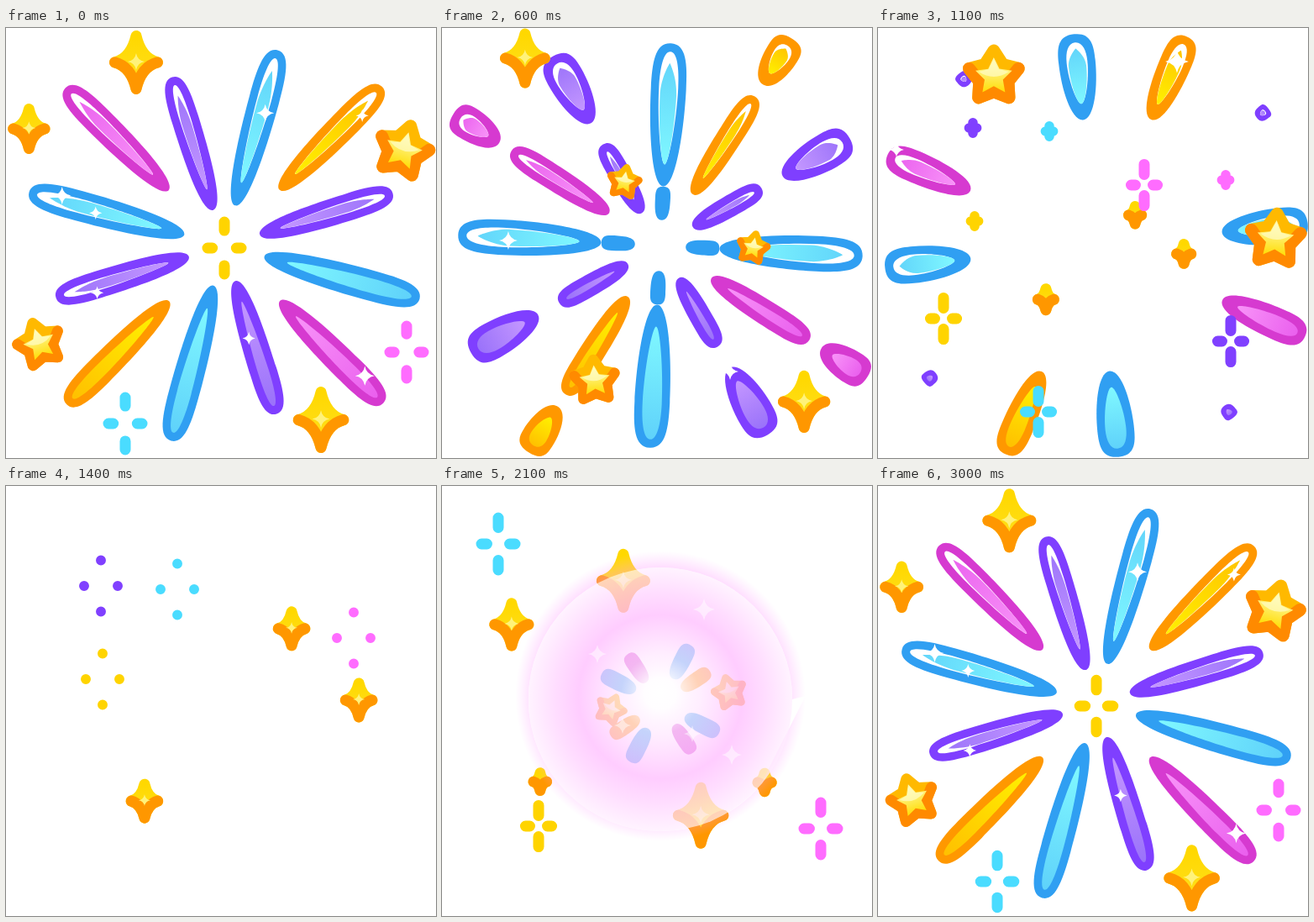
Animation, 512 px wide and 512 px high, one loop 3.02 s. Source, as an HTML page with a canvas:

```html
<!DOCTYPE html>
<html>
<head>
<meta charset="utf-8">
<style>
html, body { margin: 0; width: 100%; height: 100%; overflow: hidden; background: #fff; }
canvas { display: block; width: 512px; height: 512px; }
</style>
</head>
<body>
<canvas id="stage" width="512" height="512"></canvas>
<script>
const ctx = document.getElementById('stage').getContext('2d');
const LOOP = 3020, HOLD = 3010, CX = 260, CY = 259, RAD = Math.PI / 180;

// Linear keyframes [time, ...values]; null outside their range.
function key(t, keys) {
  for (let i = 1; i < keys.length; i++) {
    const a = keys[i - 1], b = keys[i];
    if (t >= a[0] && t <= b[0]) {
      const p = (t - a[0]) / (b[0] - a[0]);
      return a.slice(1).map((v, j) => v + (b[j + 1] - v) * p);
    }
  }
  return null;
}
// Keyframes may run past the end of the loop.
const at = (t, keys) => key(t, keys) || key(t + LOOP, keys);

const SPIN = [[2000, 14], [2100, 11.5], [2400, 6.5], [HOLD, 0], [3620, -12.5], [4120, -21.5], [4500, -28]];

// Bursts: [time, inner radius, outer radius, half width]
const PETALS = [
  {
    edge: '#7f3fff', from: '#c497ff', to: '#9a72fa', angles: [253, -17, 73, 163],
    waves: [
      [[2250, 44, 46, 3], [2400, 37, 97, 10], [HOLD, 42, 209, 16], [3620, 167, 259, 22], [3850, 256, 268, 0]],
      [[400, 28, 30, 3], [600, 44, 138, 13], [900, 170, 262, 20], [1100, 244, 262, 9], [1150, 254, 258, 0]]
    ]
  },
  {
    edge: '#309ff2', from: '#80f8ff', to: '#5fd2fa', angles: [-74.5, 15.5, 105.5, 195.5],
    waves: [
      [[2040, 25, 30, 4], [2100, 33, 78, 10], [2400, 45, 190, 16], [HOLD, 49, 241, 18], [3620, 70, 241, 21], [3850, 200, 256, 18], [3950, 250, 258, 0]],
      [[480, 25, 30, 4], [600, 30, 70, 9], [1100, 150, 253, 22], [1350, 258, 264, 0]]
    ]
  },
  {
    edge: '#d63ad0', from: '#f893f8', to: '#ea60ee', angles: [225, 45],
    waves: null
  },
  {
    edge: '#ff9800', from: '#fff000', to: '#ffc000', angles: [-45, 135],
    waves: null
  }
];
const DIAGONAL = [
  [[2040, 25, 30, 4], [2100, 30, 70, 9], [2400, 78, 218, 16], [HOLD, 91, 266, 17], [3620, 227, 292, 20], [3760, 285, 295, 0]],
  [[380, 25, 30, 4], [600, 72, 210, 15], [1100, 163, 271, 19], [1300, 272, 280, 0]]
];

// Four-pointed gold stars: [time, x, y, scale]
const GEMS = [
  [[1580, 246, 165, 0], [1760, 238, 138, .53], [2100, 216, 113, 1], [2400, 180, 54, 1], [HOLD, 156, 41, 1], [3620, 99, 36, .94], [3800, 75, 40, 0]],
  [[1900, 115, 195, 0], [2100, 83, 165, .83], [2400, 39, 137, .82], [HOLD, 28, 120, .81], [3400, 5, 120, 0]],
  [[1960, 296, 355, 0], [2100, 308, 392, 1.04], [2400, 347, 457, 1.03], [HOLD, 374, 467, 1.04], [3620, 431, 445, .98], [3800, 455, 430, 0]],
  [[1600, 190, 285, 0], [1760, 176, 307, .5], [2100, 117, 352, .45], [2200, 100, 360, 0]],
  [[1600, 305, 368, 0], [1760, 333, 365, .6], [2100, 384, 353, .46], [2200, 398, 348, 0]],
  [[1000, 296, 233, 0], [1100, 306, 223, .44], [1400, 340, 170, .7], [1620, 355, 140, 0]],
  [[1000, 345, 267, 0], [1100, 364, 269, .47], [1400, 420, 255, .7], [1620, 450, 240, 0]],
  [[1000, 208, 312, 0], [1100, 200, 323, .5], [1400, 165, 375, .7], [1620, 150, 405, 0]]
];

// Five-pointed gold stars: [time, x, y, scale, tilt]
const STARS = [
  [[2020, 318, 252, 0, -20], [2100, 342, 246, .58, -15], [2400, 430, 200, 1, -8], [HOLD, 472, 148, 1, 16], [3300, 500, 100, .8, 25], [3450, 510, 80, 0, 30]],
  [[2020, 220, 264, 0, 30], [2100, 201, 266, .52, 24], [2400, 98, 322, .86, 14], [HOLD, 41, 375, .86, -18], [3300, 18, 415, .7, -30], [3450, 8, 430, 0, -35]],
  [[430, 236, 220, 0, 15], [600, 217, 184, .57, 10], [1100, 138, 58, 1, 0], [1400, 95, 28, 0, -8]],
  [[430, 335, 264, 0, 20], [600, 370, 262, .55, 12], [1100, 473, 252, 1, 4], [1400, 505, 240, 0, -5]],
  [[380, 205, 365, 0, 0], [600, 182, 420, .82, -4], [850, 160, 470, .8, -10], [980, 150, 490, 0, -14]]
];

// White glints: [time, x, y, radius]
const GLINTS = [
  [[2250, 312, 130, 0], [2400, 311, 117, 12], [HOLD, 309, 102, 11], [3300, 300, 85, 0]],
  [[2250, 405, 150, 0], [2400, 416, 135, 9], [HOLD, 424, 105, 8], [3250, 428, 90, 0]],
  [[2250, 125, 207, 0], [2400, 105, 203, 12], [HOLD, 67, 199, 11], [3300, 60, 215, 0]],
  [[2300, 135, 226, 0], [2400, 128, 224, 6], [HOLD, 107, 220, 8], [3300, 100, 225, 0]],
  [[2700, 120, 312, 0], [HOLD, 109, 315, 8], [3250, 100, 320, 0]],
  [[2700, 285, 355, 0], [HOLD, 289, 369, 8], [3250, 293, 380, 0]],
  [[2700, 410, 400, 0], [HOLD, 427, 414, 12], [3300, 435, 418, 0]],
  [[430, 79, 245, 0], [600, 79, 253, 11], [780, 70, 262, 0]],
  [[430, 340, 400, 0], [600, 343, 409, 10], [780, 347, 418, 0]],
  [[980, 356, 48, 0], [1100, 356, 40, 14], [1220, 356, 32, 0]],
  [[980, 26, 148, 0], [1100, 22, 145, 9], [1220, 18, 142, 0]]
];

// Crosses: [x, y, start, colour, life]
const YEL = '#ffd400', PINK = '#ff6cff', CYAN = '#4adcff', VIO = '#8040ff';
const LIFE = 420;
const CROSSES = [
  [260, 262, 2795, YEL], [142, 471, 2795, CYAN], [477, 386, 2300, PINK, 1280],
  [78, 346, 974, YEL], [317, 187, 974, PINK], [191, 457, 974, CYAN], [420, 373, 974, VIO],
  [113, 119, 1058, VIO], [204, 123, 1058, CYAN], [115, 230, 1058, YEL], [414, 181, 1058, PINK],
  [358, 88, 1424, YEL], [245, 263, 1424, CYAN], [167, 289, 1424, VIO], [324, 445, 1424, PINK],
  [286, 71, 1550, VIO], [443, 247, 1550, CYAN], [350, 312, 1550, YEL], [264, 365, 1550, PINK],
  [352, 191, 1634, VIO], [162, 162, 1634, YEL], [88, 327, 1634, PINK], [189, 403, 1634, CYAN],
  [67, 69, 1890, CYAN], [451, 408, 1890, PINK], [115, 405, 1974, YEL]
];
// [phase, v inner, v outer, h inner, h outer, thickness]
const CROSS = [
  [0, 0, 0, 0, 0, 0], [.1, 5, 6, 4, 4.5, 11.5], [.3, 12.5, 24.5, 10.5, 15.5, 13],
  [.5, 19.5, 31, 13.5, 20, 13], [.8, 30.5, 30.5, 20, 20, 13], [1, 30.5, 30.5, 20, 20, 0]
];

function fill(style) { ctx.fillStyle = style; ctx.fill(); }
function stroke(style, width) {
  ctx.strokeStyle = style;
  ctx.lineWidth = width;
  ctx.stroke();
}
function grad(x0, y0, x1, y1, a, b) {
  const g = ctx.createLinearGradient(x0, y0, x1, y1);
  g.addColorStop(0, a);
  g.addColorStop(1, b);
  return g;
}

function teardrop(a, b, w, n, tip) {
  const len = b - a, m = a + len * .68;
  ctx.beginPath();
  ctx.moveTo(a, 0);
  ctx.bezierCurveTo(a, -n, m - len * .3, -w, m, -w);
  ctx.bezierCurveTo(m + len * .18, -w, b, -w * tip, b, 0);
  ctx.bezierCurveTo(b, w * tip, m + len * .18, w, m, w);
  ctx.bezierCurveTo(m - len * .3, w, a, n, a, 0);
}

function petal(style, angle, a, b, w) {
  const len = b - a;
  if (w < .5 || len < 1) return;
  ctx.save();
  ctx.translate(CX, CY);
  ctx.rotate(angle * RAD);
  teardrop(a, b, w, Math.min(14, w), .9);
  fill(style.edge);
  const half = w - Math.min(9.5, len * .3);
  if (half > 1) {
    const i = a + Math.min(len * .1 + 9, len * .3), o = b - Math.min(10, len * .28);
    const shade = grad(i, 0, o, 0, style.from, style.to);
    const shiny = Math.sin((angle + 8) * RAD) < .36;
    teardrop(i, o, half, half * .4, .7);
    fill(shiny ? '#fff' : shade);
    if (shiny) {
      teardrop(i, o - (o - i) * .1, half * .85, half * .4, 0);
      fill(shade);
    }
  }
  ctx.restore();
}

function spark(x, y, r, ry, style) {
  ctx.beginPath();
  ctx.moveTo(x, y - ry);
  ctx.quadraticCurveTo(x + r * .15, y - ry * .15, x + r, y);
  ctx.quadraticCurveTo(x + r * .15, y + ry * .15, x, y + ry);
  ctx.quadraticCurveTo(x - r * .15, y + ry * .15, x - r, y);
  ctx.quadraticCurveTo(x - r * .15, y - ry * .15, x, y - ry);
  fill(style);
}

function gem([x, y, s]) {
  if (s < .03) return;
  const lw = 13 * Math.min(1, s * 2.2), px = 32 * s - lw / 2, py = 38 * s - lw / 2;
  const kx = px * .24, ky = py * .16;
  ctx.save();
  ctx.translate(x, y);
  ctx.beginPath();
  ctx.moveTo(-px, 0);
  ctx.quadraticCurveTo(-kx, -ky, 0, -py);
  ctx.quadraticCurveTo(kx, -ky, px, 0);
  ctx.quadraticCurveTo(kx, ky, 0, py);
  ctx.quadraticCurveTo(-kx, ky, -px, 0);
  ctx.closePath();
  const tone = grad(0, -py, 0, py, '#ffd800', '#ffe020');
  fill(tone);
  stroke(tone, lw);
  ctx.beginPath();
  ctx.moveTo(-px, 0);
  ctx.quadraticCurveTo(-kx, ky, 0, py);
  ctx.quadraticCurveTo(kx, ky, px, 0);
  stroke('#ff9700', lw);
  if (s > .65) spark(0, -1, 10 * s, 10 * s, '#fff27a');
  ctx.restore();
}

function starPoints(outer, inner) {
  return Array.from({ length: 10 }, (_, i) => {
    const r = i % 2 ? inner : outer, a = (i * 36 - 90) * RAD;
    return [r * Math.cos(a), r * Math.sin(a)];
  });
}
function trace(points) {
  ctx.beginPath();
  points.forEach(p => ctx.lineTo(p[0], p[1]));
}

function star([x, y, s, tilt]) {
  if (s < .03) return;
  ctx.save();
  ctx.translate(x, y);
  ctx.rotate(tilt * RAD);
  ctx.scale(s, s);
  const rim = starPoints(31, 18);
  trace(rim);
  ctx.closePath();
  fill('#ffc400');
  stroke('#ffb900', 15);
  trace(rim.slice(2, 9));
  stroke('#ff8a00', 15);
  trace(starPoints(23, 11.5));
  ctx.closePath();
  fill(grad(0, -18, 0, 20, '#fff9a8', '#ffdc00'));
  ctx.beginPath();
  ctx.moveTo(-18, -6);
  ctx.lineTo(-6, -9);
  ctx.lineTo(0, -20);
  ctx.lineTo(6, -9);
  ctx.lineTo(18, -6);
  ctx.quadraticCurveTo(0, 6, -18, -6);
  fill('rgba(255,252,200,.7)');
  ctx.restore();
}

function cross(t, [x, y, start, color, life = LIFE]) {
  const p = ((t - start + LOOP) % LOOP) / life;
  if (p > 1) return;
  const [vi, vo, hi, ho, lw] = key(p, CROSS);
  if (lw < .5) return;
  ctx.beginPath();
  for (const d of [-1, 1]) {
    ctx.moveTo(x, y + d * vi);
    ctx.lineTo(x, y + d * vo + .01);
    ctx.moveTo(x + d * hi, y);
    ctx.lineTo(x + d * ho + .01, y);
  }
  stroke(color, lw);
}

function glow(t) {
  const k = key(t, [[1960, 1, .6], [2100, 156, 1], [2160, 222, .75], [2220, 236, .45], [2340, 244, 0]]);
  if (!k) return;
  const [r, alpha] = k, y = 254;
  ctx.save();
  ctx.globalAlpha = alpha;
  const halo = ctx.createRadialGradient(CX, y - 4, r * .95, CX, y - 4, r * 1.1);
  halo.addColorStop(0, 'rgba(255,150,255,.4)');
  halo.addColorStop(1, 'rgba(255,170,255,0)');
  ctx.beginPath();
  ctx.arc(CX, y - 4, r * 1.1, 0, 7);
  ctx.arc(CX, y, r, 0, 7, true);
  ctx.fillStyle = halo;
  ctx.fill('evenodd');
  const g = ctx.createRadialGradient(CX, y - 8, 0, CX, y, r);
  [[0, 255, 1], [.12, 253, .95], [.3, 232, .72], [.62, 190, .78], [.8, 210, .75], [1, 238, .72]]
    .forEach(([p, green, a]) => g.addColorStop(p, `rgba(255,${green},255,${a})`));
  ctx.beginPath();
  ctx.arc(CX, y, r, 0, 7);
  fill(g);
  ctx.globalAlpha = alpha * .5;
  [[312, 147, 13], [185, 200, 11], [345, 320, 12], [298, 295, 10], [215, 285, 10]]
    .forEach(([sx, sy, sr]) => spark(sx, sy, sr, sr, '#fff'));
  ctx.restore();
}

function draw(t) {
  ctx.fillStyle = '#fff';
  ctx.fillRect(0, 0, 512, 512);
  ctx.lineCap = ctx.lineJoin = 'round';
  const spin = at(t, SPIN);
  for (const p of PETALS) {
    for (const wave of p.waves || DIAGONAL) {
      const k = at(t, wave);
      if (k) p.angles.forEach(a => petal(p, a + spin[0], ...k));
    }
  }
  for (const g of GLINTS) {
    const k = at(t, g);
    if (k) spark(k[0], k[1], k[2], k[2], '#fff');
  }
  for (const [list, paint] of [[GEMS, gem], [STARS, star]]) {
    for (const item of list) {
      const k = at(t, item);
      if (k) paint(k);
    }
  }
  CROSSES.forEach(c => cross(t, c));
  glow(t);
}

function frame() {
  draw(performance.now() % LOOP);
  requestAnimationFrame(frame);
}
frame();
</script>
</body>
</html>
```
